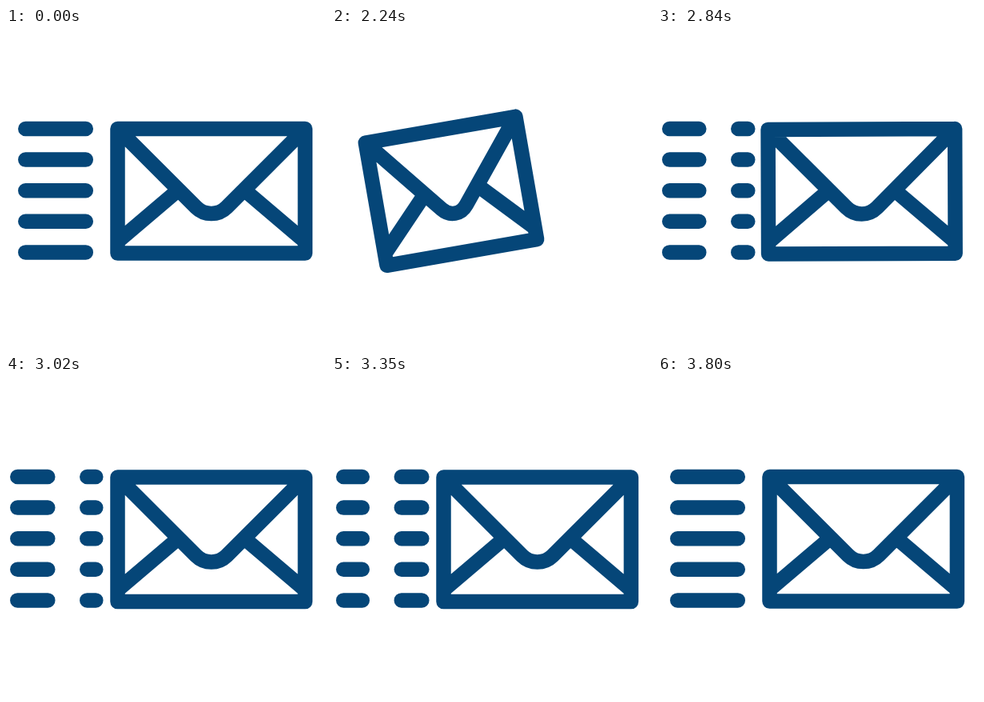
Write an HTML page with a canvas that moves like this. It is 400 px wide and 400 px high and loops after 3830 ms.

```html
<!DOCTYPE html>
<html lang="en">
<head>
<meta charset="utf-8">
<title>Sending mail</title>
<style>
  html, body { margin: 0; width: 100%; height: 100%; overflow: hidden; background: #fff; }
  canvas { display: block; width: 400px; height: 400px; }
</style>
</head>
<body>
<canvas id="stage" width="400" height="400"></canvas>
<script>
const ctx = document.getElementById('stage').getContext('2d');
const LOOP = 3830, STEP = 30;
const PULL = 2000, RELEASE = 2540, REST = 3800;
const INK = '#054678', STROKE = 18.5;
const CENTER = { x: 256.7, y: 203.8 };
const HALF = { w: 117.2, h: 77.8 };
const TRACK = { from: 14.3, length: 98 };

const clamp = v => Math.min(1, Math.max(0, v));
const mod = (v, n) => ((v % n) + n) % n;

// How far the envelope is drawn back: 0 at rest, 1 fully.
function pullAt(t) {
  if (t < PULL + STEP || t >= REST) return 0;
  if (t < RELEASE) return 1 - Math.exp(-(t - PULL) / 54);
  return Math.pow(clamp(1 - (t - RELEASE) / 330), 1.65);
}

function envelope(pull, dy) {
  const { w, h } = HALF;
  ctx.save();
  ctx.translate(CENTER.x - 109 * pull, CENTER.y + dy);
  ctx.rotate(-10 * pull * Math.PI / 180);
  ctx.scale(1 - 0.19 * pull, 1);
  ctx.beginPath();
  ctx.rect(-w, -h, 2 * w, 2 * h);
  ctx.moveTo(-w, -h);
  ctx.arcTo(0, w - h, w, -h, 27);
  ctx.lineTo(w, -h);
  for (const side of [-1, 1]) {
    ctx.moveTo(side * w, 63.2);
    ctx.lineTo(side * 41, -1.6);
  }
  // Stroke outside the squeeze so the line keeps its weight.
  ctx.restore();
  ctx.stroke();
}

// The same horizontal dash on all five rows.
function dash(x1, x2) {
  if (x2 <= x1) return;
  ctx.beginPath();
  for (let row = 0; row < 5; row++) {
    const y = 126 + 38.6 * row;
    ctx.moveTo(x1, y);
    ctx.lineTo(x2, y);
  }
  ctx.stroke();
}

function flowingDashes(t, pull) {
  const { from, length } = TRACK;
  const reach = from + length * clamp((0.8 - pull) / 0.7);
  const half = length / 2;
  const start = from + mod(39 + half + 0.55 * (t - 3200), length);
  for (const x of [start - length, start]) {
    dash(Math.max(from, x), Math.min(reach, x + half));
  }
}

function draw(t) {
  const pull = pullAt(t);
  const flowing = t >= RELEASE && t < REST;
  ctx.fillStyle = '#fff';
  ctx.fillRect(0, 0, 400, 400);
  ctx.strokeStyle = INK;
  ctx.lineWidth = STROKE;
  ctx.lineCap = ctx.lineJoin = 'round';
  if (flowing) flowingDashes(t, pull);
  else dash(24.3, 24.3 + 75.5 * (1 - 1.04 * pull));
  envelope(pull, flowing ? 0.5 : 0);
}

const begin = performance.now();
function tick() {
  const t = mod(performance.now() - begin, LOOP);
  draw(t < PULL + STEP ? 0 : PULL + Math.floor((t - PULL) / STEP) * STEP);
  requestAnimationFrame(tick);
}
tick();
</script>
</body>
</html>
```
